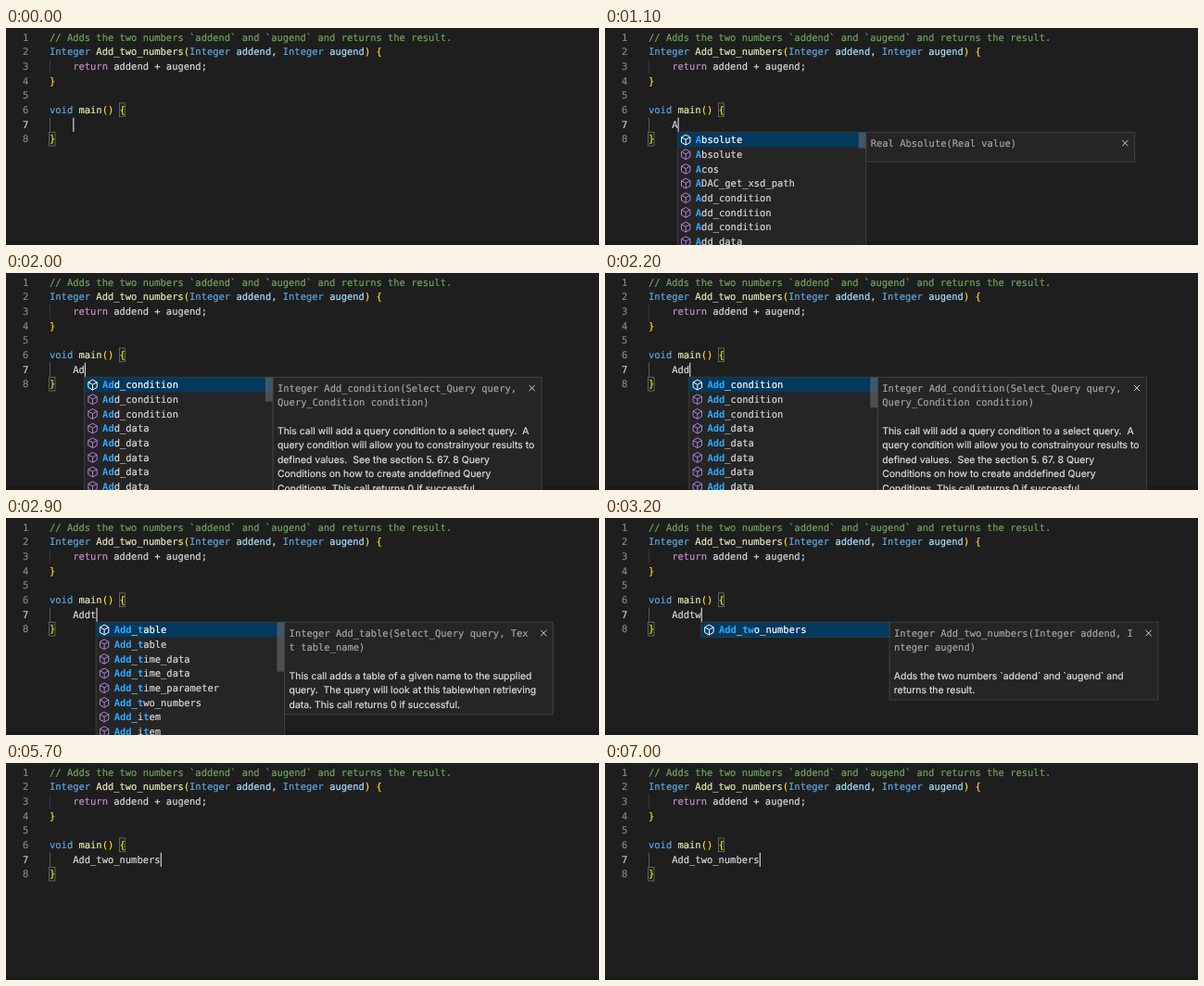
Write an HTML page that moves like this. It is 640 px wide and 234 px high and loops after 7.1 s.

```html
<!DOCTYPE html>
<html lang="en">
<head>
<meta charset="utf-8">
<title>Code completion</title>
<style>
  html, body { margin: 0; width: 100%; height: 100%; overflow: hidden; background: #1e1e1e; }
  svg { display: block; width: 640px; height: 234px; }
  text {
    white-space: pre; text-rendering: geometricPrecision;
    font: 10.46px "DejaVu Sans Mono", monospace; color: #d8d8d8;
  }
  text, tspan { fill: currentColor; stroke: currentColor; stroke-width: 0.18px; }
  .prose { font: 10.44px Inter, sans-serif; color: #dedede; }
  .sig { color: #a4a4a4; }
  .hit { color: #2aaaff; font-weight: bold; stroke-width: 0; }
</style>
</head>
<body>
<svg id="stage" viewBox="0 0 640 234"></svg>
<script>
const LOOP = 7100, CHAR = 6.3, LINE = 15.66, LEFT = 47, INDENT = LEFT + 4 * CHAR;
const BASE = 13.8, LIST_W = 203.6, DOC_W = 290, POP_Y = 112.2;
const stage = document.getElementById("stage");

function add(parent, tag, attrs, text) {
  const el = document.createElementNS("http://www.w3.org/2000/svg", tag);
  for (const k in attrs) el.setAttribute(k, attrs[k]);
  if (text !== undefined) el.textContent = text;
  parent.appendChild(el);
  return el;
}
const rect = (p, x, y, width, height, fill, more) => add(p, "rect", { x, y, width, height, fill, ...more });

const colors = {
  comment: "#6fa35a", type: "#5ea8e2", fn: "#e8e8b6", arg: "#a8e0ff",
  brace: "#ffdc20", flow: "#c88cc4", plain: "#d8d8d8"
};
const code = [
  [["comment", "// Adds the two numbers `addend` and `augend` and returns the result."]],
  [["type", "Integer "], ["fn", "Add_two_numbers"], ["brace", "("], ["type", "Integer "], ["arg", "addend"],
   ["plain", ", "], ["type", "Integer "], ["arg", "augend"], ["brace", ") {"]],
  [["flow", "    return "], ["plain", "addend + augend;"]],
  [["brace", "}"]],
  [],
  [["type", "void "], ["fn", "main"], ["brace", "() {"]],
  [],
  [["brace", "}"]]
];

// Editor background and fixed code
rect(stage, 0, 0, 640, 234, "#1e1e1e");
rect(stage, 0, 230.5, 640, 3.5, "#191919");
rect(stage, LEFT, 34, 0.7, LINE, "#404040");
rect(stage, LEFT, 96.5, 0.7, LINE, "#707070");
for (const [col, row] of [[12, 5], [0, 7]])
  rect(stage, LEFT + col * CHAR - 0.3, 2.6 + row * LINE, CHAR, LINE - 0.8, "#1c251c",
    { stroke: "#888", "stroke-width": 0.6 });
code.forEach((parts, i) => {
  const y = BASE + i * LINE;
  add(stage, "text", { x: 24.4, y, "text-anchor": "end", style: `color:${i === 6 ? "#d0d0d0" : "#858585"}` }, i + 1);
  const line = add(stage, "text", { x: LEFT, y });
  for (const [kind, s] of parts) add(line, "tspan", { style: `color:${colors[kind]}` }, s);
});
const typed = add(stage, "text", { x: INDENT, y: BASE + 6 * LINE });
const caret = rect(stage, 0, 96.7, 1.2, 15.2, "#d0d0d0");

const repeat = (s, n) => Array(n).fill(s);
const condition = {
  sig: ["Integer Add_condition(Select_Query query, ", "Query_Condition condition)"],
  text: ["This call will add a query condition to a select query.  A",
    "query condition will allow you to constrainyour results to",
    "defined values.  See the section 5. 67. 8 Query",
    "Conditions on how to create anddefined Query",
    "Conditions. This call returns 0 if successful."]
};
const addItems = [...repeat("Add_condition", 3), ...repeat("Add_data", 5)];

const popups = [
  { key: "A", thumb: 17, sig: ["Real Absolute(Real value)"], text: [],
    items: ["Absolute", "Absolute", "Acos", "ADAC_get_xsd_path", ...addItems.slice(0, 4)] },
  { key: "Ad", thumb: 26, items: addItems, ...condition },
  { key: "Add", thumb: 32.5, items: addItems, ...condition },
  { key: "Addt", thumb: 53,
    items: ["Add_table", "Add_table", "Add_time_data", "Add_time_data", "Add_time_parameter",
      "Add_two_numbers", "Add_item", "Add_item"],
    sig: ["Integer Add_table(Select_Query query, Tex", "t table_name)"],
    text: ["This call adds a table of a given name to the supplied",
      "query.  The query will look at this tablewhen retrieving",
      "data. This call returns 0 if successful."] },
  { key: "Addtw", thumb: 0, items: ["Add_two_numbers"],
    sig: ["Integer Add_two_numbers(Integer addend, I", "nteger augend)"],
    text: ["Adds the two numbers `addend` and `augend` and", "returns the result."] }
];

// Marks the typed letters where they occur in order
function label(parent, x, y, word, key, selected) {
  const el = add(parent, "text", { x, y, style: selected ? "color:#fff" : "" });
  let n = 0;
  for (const part of word) {
    const hit = n < key.length && part.toLowerCase() === key[n].toLowerCase();
    if (hit) n++;
    add(el, "tspan", hit ? { class: "hit" } : {}, part);
  }
}

function cube(parent, x, y, stroke) {
  add(parent, "path", {
    d: "M0-5.3 4.7-2.7V2.9L0 5.5-4.7 2.9V-2.7ZM-4.7-2.7 0-.2 4.7-2.7M0-.2V5.5",
    transform: `translate(${x} ${y})`, fill: "none", stroke, "stroke-width": 1, "stroke-linejoin": "round"
  });
}

function buildPopup({ key, thumb, items, sig, text }) {
  const x = INDENT + key.length * CHAR - 0.3, right = x + LIST_W, end = right + DOC_W;
  const edge = { stroke: "#4b4b4b", "stroke-width": 0.7 };
  const list = add(stage, "g", {}), doc = add(stage, "g", {});

  rect(list, x, POP_Y, LIST_W, items.length * LINE + 0.8, "#252526", edge);
  rect(list, x + 0.4, POP_Y + 0.4, LIST_W - 0.4, LINE, "#04395e");
  items.forEach((word, i) => {
    const mid = POP_Y + 8.3 + i * LINE;
    cube(list, x + 9, mid, i ? "#b180d7" : "#ffffff");
    label(list, x + 19.6, mid + 3.7, word, key, !i);
  });
  if (thumb) rect(list, right - 8.2, POP_Y + 0.4, 8, thumb, "#797979", { opacity: 0.5 });

  const lines = sig.length + (text.length ? text.length + 1 : 0);
  const height = text.length ? lines * LINE + 5.6 : 32;
  rect(doc, right, POP_Y, DOC_W, height, "#252526", edge);
  sig.forEach((s, i) => add(doc, "text", { class: "sig", x: right + 4.9, y: 127.6 + i * LINE }, s));
  text.forEach((s, i) => add(doc, "text", { class: "prose", x: right + 4.8, y: 173.5 + i * LINE }, s));
  add(doc, "path", {
    d: "M-3.1-3.1 3.1 3.1M3.1-3.1-3.1 3.1", transform: `translate(${end - 10.4} 124.1)`,
    stroke: "#d4d4d4", "stroke-width": 1
  });
  return { key, list, doc };
}
const built = popups.map(buildPopup);

// Each keystroke restarts the caret blink
const strokes = [
  [-1400, ""], [900, "A"], [2000, "Ad"], [2200, "Add"], [2600, "Addt"], [3000, "Addtw"], [5700, "Add_two_numbers"]
];

function render(t) {
  const [start, word] = strokes.filter(s => s[0] <= t).pop();
  const age = t - start, half = Math.floor(age / 500), part = age % 500;
  typed.textContent = word;
  caret.setAttribute("x", INDENT + word.length * CHAR);
  caret.setAttribute("opacity", half % 2 ? 0 : half ? Math.min(1, part / 100) : 1);
  for (const { key, list, doc } of built) {
    const on = key === word;
    list.setAttribute("display", on && t >= 1000 ? "inline" : "none");
    doc.setAttribute("display", on && t >= 1100 ? "inline" : "none");
  }
}

const begin = performance.now();
function tick() {
  render((performance.now() - begin) % LOOP);
  requestAnimationFrame(tick);
}
render(0);
requestAnimationFrame(tick);
</script>
</body>
</html>
```
